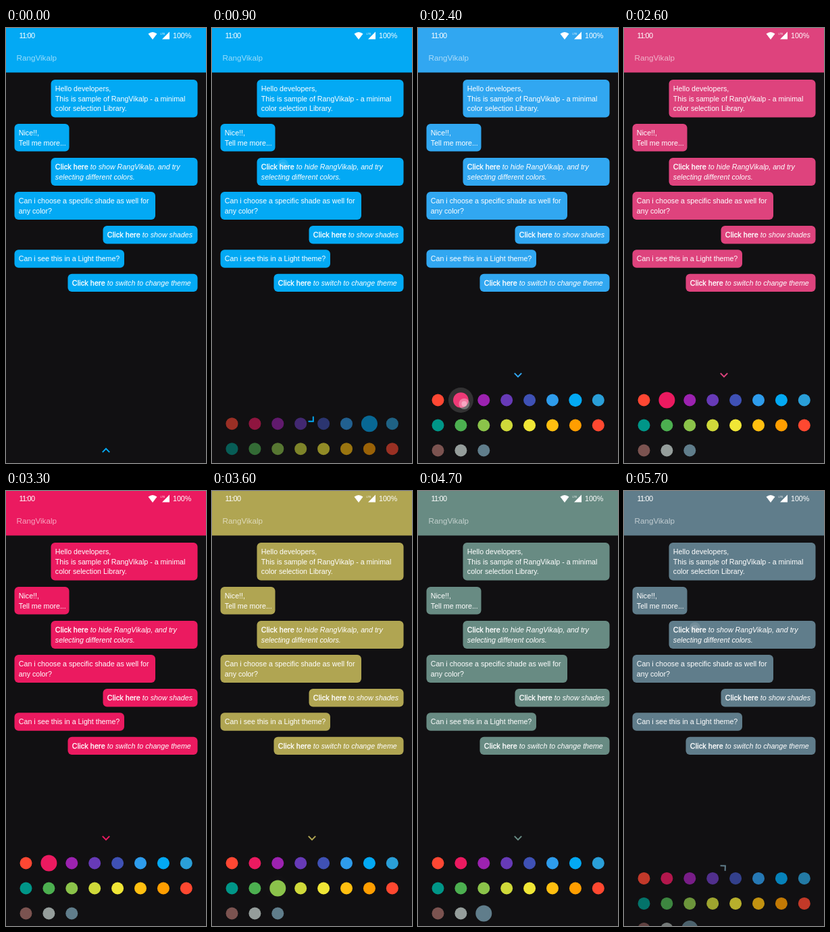
Recreate the animation shown at these times as an HTML page. Size 296 px wide and 640 px high, loop 5800 ms.

```html
<!DOCTYPE html>
<html lang="en">
<head>
<meta charset="utf-8">
<title>Colour picker chat</title>
<style>
html, body { margin: 0; width: 100%; height: 100%; overflow: hidden; background: #111012; }
svg { display: block; width: 296px; height: 640px; }
text { font: 10.68px "Liberation Sans", Arial, sans-serif; fill: #fff; }
.strong { stroke: #fff; stroke-width: .35px; letter-spacing: .16px; }
.soft { font-style: italic; }
.title { font-size: 11.7px; fill-opacity: .6; }
.clock { font-size: 11px; letter-spacing: -.8px; }
.net { font-size: 4px; }
</style>
</head>
<body>
<svg id="stage" viewBox="0 0 296 640">
  <rect width="296" height="640" fill="#111012"/>
  <g id="themed">
    <rect width="296" height="65.5"/>
  </g>
  <text class="clock" x="19.5" y="15">11:00</text>
  <path d="M210.5 8.6Q217 3.6 223.5 8.6L217 17Z" fill="#fff"/>
  <path d="M242 5.5V16.5H231Z" fill="#fff"/>
  <text class="net" x="228.5" y="9.5">LTE</text>
  <text x="247" y="15">100%</text>
  <text class="title" x="15.5" y="48">RangVikalp</text>
  <g id="labels"></g>
  <g id="sheet"></g>
  <path id="chevron" d="M-5.2 2.6L0 -2.6L5.2 2.6" fill="none" stroke-width="2"/>
  <g id="touches"></g>
</svg>
<script>
const LOOP = 5800;
const NS = "http://www.w3.org/2000/svg";
const $ = id => document.getElementById(id);

function add(parent, tag, attrs, content = "") {
  const el = document.createElementNS(NS, tag);
  for (const k in attrs) el.setAttribute(k, attrs[k]);
  el.textContent = content;
  parent.append(el);
  return el;
}
const set = (el, attrs) => { for (const k in attrs) el.setAttribute(k, attrs[k]); };
const ramp = (t, start, length) => Math.min(1, Math.max(0, (t - start) / length));
const ease = p => .5 - Math.cos(Math.PI * p) / 2;
const lerp = (a, b, p) => a + (b - a) * p;

// Chat bubbles: x, y, width, height, lines; "*" marks a line opening with a link
const bubbles = [
  [66.5, 76, 217, 55.5, ["Hello developers,", "This is sample of RangVikalp - a minimal", "color selection Library."]],
  [12.5, 141, 81, 40.5, ["Nice!!,", "Tell me more..."]],
  [66.5, 191, 217, 41, ["* to show RangVikalp, and try", "_selecting different colors."]],
  [12.5, 241, 208.5, 41, ["Can i choose a specific shade as well for", "any color?"]],
  [143.5, 291, 140, 26.5, ["* to show shades"]],
  [12.5, 326.3, 162.5, 26.5, ["Can i see this in a Light theme?"]],
  [91.5, 361.7, 192, 26.3, ["* to switch to change theme"]]
];
const links = [];
for (const [x, y, width, height, lines] of bubbles) {
  add($("themed"), "rect", { x, y, width, height, rx: 6 });
  lines.forEach((line, i) => {
    const label = add($("labels"), "text", { x: x + 6.3, y: y + 17 + i * 14.6 });
    if (line[0] === "*") {
      add(label, "tspan", { class: "strong" }, "Click here");
      links.push(add(label, "tspan", { class: "soft" }, line.slice(1)));
    } else if (line[0] === "_") {
      add(label, "tspan", { class: "soft" }, line.slice(1));
    } else label.textContent = line;
  });
}

const palette = ("ff4733 eb1a60 9c22b0 673ab7 3f51b5 2e9cec 03a9f4 2a9fd8 " +
  "009688 4caf50 8bc34a cfd93a f0e636 ffbf10 ff9e00 ff4830 " +
  "7b5350 959d9b 607d8b").split(" ");
const place = i => [29.5 + (i % 8) * 33.9, 547.5 + Math.floor(i / 8) * 37];
const swatches = palette.map((c, i) => {
  const [cx, cy] = place(i);
  return add($("sheet"), "circle", { cx, cy, r: 9, fill: "#" + c });
});

// Selections: time and palette index
const FIRST = 6;
const picks = [[2367, 1], [3414, 10], [4480, 18]];
const OPEN = 770, CLOSE = 5573, MOVE = 300;

const touches = [
  { x: 105, y: 201, at: OPEN, lead: 170 },
  ...picks.map(([at, i]) => {
    const [x, y] = place(i);
    return { x: x + 5, y: y + 5.5, at, lead: 90, ripple: [x, y] };
  }),
  { x: 105, y: 201, at: CLOSE, lead: 170 }
];
for (const touch of touches) {
  if (touch.ripple) {
    touch.wave = add($("touches"), "circle", { cx: touch.ripple[0], cy: touch.ripple[1], fill: "#fff" });
  }
  touch.dot = add($("touches"), "g", {});
  add(touch.dot, "circle", { cx: touch.x, cy: touch.y, r: 8, fill: "#fff", "fill-opacity": .32 });
  add(touch.dot, "circle", { cx: touch.x, cy: touch.y, r: 4, fill: "#fff", "fill-opacity": .35 });
}

const channels = hex => [0, 2, 4].map(i => parseInt(hex.slice(i, i + 2), 16));

// Blend in linear light
function mix(a, b, p) {
  const to = channels(b);
  const rgb = channels(a).map((v, i) =>
    Math.round(lerp(v ** 2.2, to[i] ** 2.2, p) ** (1 / 2.2)));
  return `rgb(${rgb})`;
}

function drawTheme(t) {
  let from = FIRST, to = FIRST, start = 0;
  for (const [at, i] of picks) {
    if (t < at - 60) break;
    [from, to, start] = [to, i, at];
  }
  const color = mix(palette[from], palette[to], ease(ramp(t, start, 300)));
  set($("themed"), { fill: color });
  set($("chevron"), { stroke: color });
  const p = ramp(t, start - 60, 120);
  swatches.forEach((s, i) => {
    const r = i === to ? (from === to ? 12 : lerp(9, 12, p)) : i === from ? lerp(12, 9, p) : 9;
    set(s, { r });
  });
}

function drawSheet(t) {
  const closing = t >= CLOSE;
  const p = ramp(t, closing ? CLOSE : OPEN, MOVE);
  const open = closing ? 1 - ease(p) : ease(p);
  const spin = 1 - (1 - p) ** 2.4;
  const angle = 180 * (closing ? 1 - spin : spin);
  set($("sheet"), {
    transform: `translate(0 ${58 * (1 - open)})`,
    opacity: open ** .6
  });
  set($("chevron"), { transform: `translate(148 ${lerp(621.5, 510.5, open)}) rotate(${angle})` });
  const verb = t >= OPEN && !closing ? "hide" : "show";
  links[0].textContent = ` to ${verb} RangVikalp, and try`;
}

function drawTouches(t) {
  for (const { at, lead, dot, wave } of touches) {
    const shown = t >= at - lead;
    set(dot, { opacity: shown ? 1 - ramp(t, at + 60, 110) : 0 });
    if (wave) {
      set(wave, {
        r: lerp(9, 18.5, ramp(t, at - lead, 100)),
        opacity: shown ? .14 * (1 - ramp(t, at + 50, 140)) : 0
      });
    }
  }
}

const begin = performance.now();
function render() {
  const t = (performance.now() - begin) % LOOP;
  drawTheme(t);
  drawSheet(t);
  drawTouches(t);
  requestAnimationFrame(render);
}
render();
</script>
</body>
</html>
```
